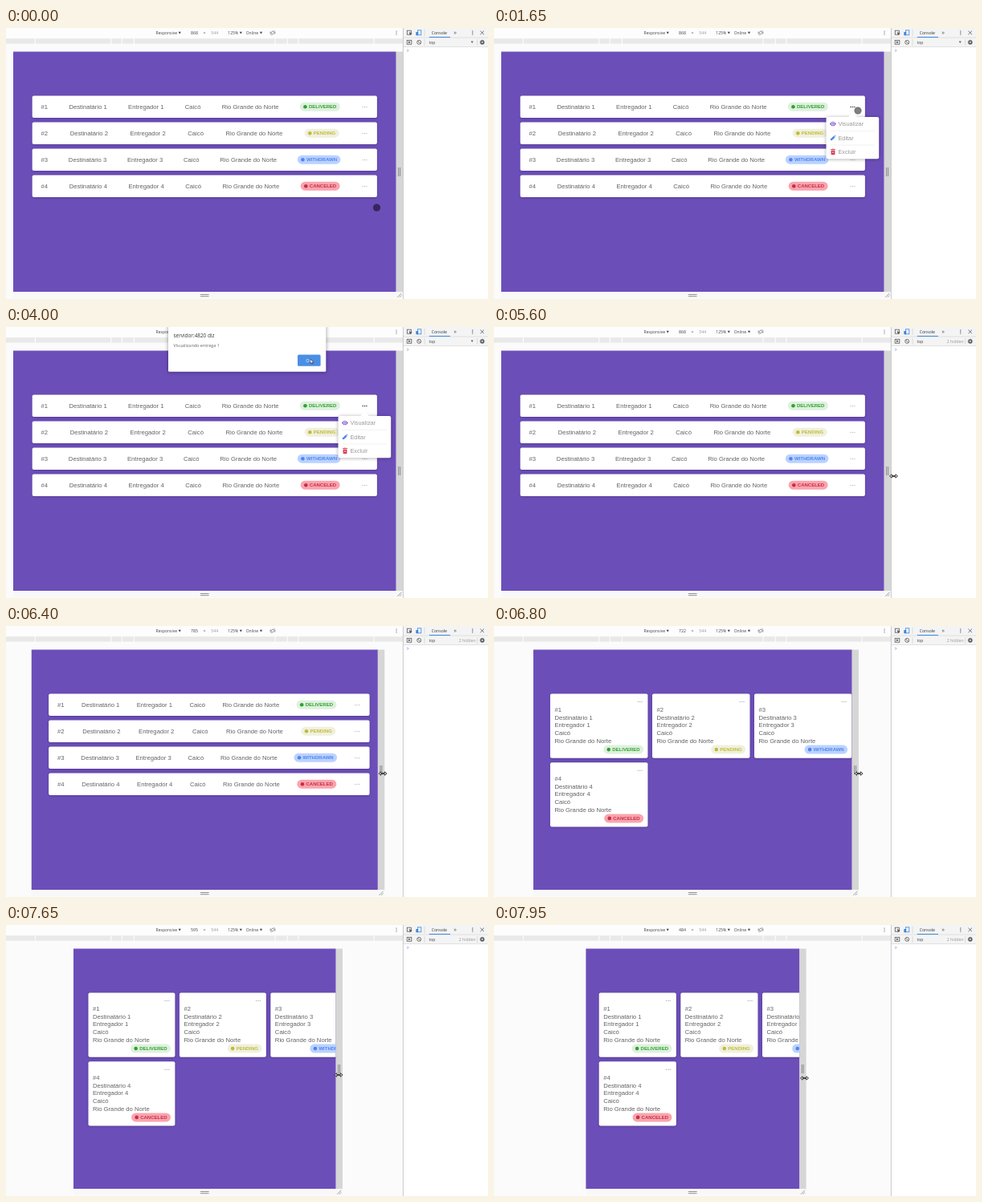
An HTML page with a canvas that plays this animation: 600 by 338 pixels, repeating every 8 s.

```html
<!DOCTYPE html>
<html lang="pt">
<head>
<meta charset="utf-8">
<title>Entregas</title>
<style>
  html, body { margin: 0; width: 100%; height: 100%; overflow: hidden; background: #fff; }
  canvas { display: block; width: 600px; height: 338px; }
</style>
</head>
<body>
<canvas id="stage"></canvas>
<script>
const W = 600, H = 338, LOOP = 8000, STEP = 50;
const SCALE = 0.549, MID = 247.25, TOP = 29.5, BOTTOM = 329;
const PAGE = '"Liberation Sans", Arial, sans-serif';
const CHROME = '"Open Sans", "Noto Sans", sans-serif';
const SIZE = 14 * SCALE, BADGE_SIZE = 11 * SCALE;

const MENU = [1500, 4800], DIALOG = [3100, 4200], HIDDEN_AT = 4250;

// [time, left edge of the viewport]
const EDGE = [[5900, 9], [6400, 31.75], [6800, 49], [7300, 65.3], [7650, 84], [7950, 114.4]];
// [time, x, y]
const POINTER = [
  [500, 461.5, 224], [1350, 447, 99], [1500, 447, 99], [1650, 453, 103], [2100, 453, 103],
  [2650, 440, 120], [3250, 440, 120], [3850, 379, 40], [4200, 379, 40],
  [4700, 447, 99], [4900, 447, 99], [5450, 497.5, 186], [5600, 497.5, 186],
  [5750, 490.5, 184], [5900, 491, 184], [6400, 469, 184], [6800, 454, 184],
  [7300, 440, 184], [7650, 414, 187], [7950, 386.5, 191]
];

const STATUS = [
  ['DELIVERED', '#dff0df', '#2ca42b'],
  ['PENDING', '#f0f0df', '#c1bc35'],
  ['WITHDRAWN', '#bad2ff', '#4d85ee'],
  ['CANCELED', '#faa4ae', '#c42f48']
];

const canvas = document.getElementById('stage');
const c = canvas.getContext('2d');
const dpr = window.devicePixelRatio || 1;
canvas.width = W * dpr;
canvas.height = H * dpr;

const within = (t, [a, b]) => t >= a && t < b;

function track(keys, t, i, ease = k => k) {
  if (t <= keys[0][0]) return keys[0][i];
  for (let n = 1; n < keys.length; n++) {
    const a = keys[n - 1], b = keys[n];
    if (t <= b[0]) return a[i] + (b[i] - a[i]) * ease((t - a[0]) / (b[0] - a[0]));
  }
  return keys[keys.length - 1][i];
}

function rect(x, y, w, h, fill) {
  c.fillStyle = fill;
  c.fillRect(x, y, w, h);
}

function box(x, y, w, h, r, fill, shadow = 0, alpha = 0.3) {
  c.save();
  if (shadow) {
    c.shadowColor = `rgba(0,0,0,${alpha})`;
    c.shadowBlur = shadow * dpr;
    c.shadowOffsetY = 0.5 * dpr;
  }
  c.fillStyle = fill;
  c.beginPath();
  c.roundRect(x, y, w, h, r);
  c.fill();
  c.restore();
}

function disc(x, y, r, fill) {
  c.fillStyle = fill;
  c.beginPath();
  c.arc(x, y, r, 0, Math.PI * 2);
  c.fill();
}

function ring(x, y, r, color, from = 0, to = Math.PI * 2) {
  c.strokeStyle = color;
  c.beginPath();
  c.arc(x, y, r, from, to);
  c.stroke();
}

function poly(points, fill, stroke) {
  c.beginPath();
  points.forEach(([x, y]) => c.lineTo(x, y));
  c.closePath();
  if (fill) { c.fillStyle = fill; c.fill(); }
  if (stroke) { c.strokeStyle = stroke; c.stroke(); }
}

function line(x1, y1, x2, y2, color, width = 0.6) {
  c.strokeStyle = color;
  c.lineWidth = width;
  c.beginPath();
  c.moveTo(x1, y1);
  c.lineTo(x2, y2);
  c.stroke();
}

// y is the vertical middle of the capitals
function text(str, x, y, size, color, family = CHROME, weight = 400) {
  c.font = `${weight} ${size}px ${family}`;
  c.fillStyle = color;
  c.fillText(str, x, y + size * 0.36);
}

function textWidth(str, size, weight = 400) {
  c.font = `${weight} ${size}px ${PAGE}`;
  return c.measureText(str).width;
}

const caret = (x, y) => poly([[x - 1.6, y - 1.3], [x + 1.6, y - 1.3], [x, y + 1.5]], '#444');

function dots(x, y, color, vertical = false, r = 0.75, gap = 2.4) {
  for (const k of [-1, 0, 1]) disc(x + (vertical ? 0 : k * gap), y + (vertical ? k * gap : 0), r, color);
}

function fields(n) {
  return ['#' + n, 'Destinatário ' + n, 'Entregador ' + n, 'Caicó', 'Rio Grande do Norte'];
}

const badgeWidth = n => textWidth(STATUS[n][0], BADGE_SIZE, 700) + 15.5;

function badge(n, x, y) {
  const [label, back, ink] = STATUS[n];
  box(x, y - 5.5, badgeWidth(n), 11, 5.5, back);
  disc(x + 6.6, y, 2.3, ink);
  text(label, x + 11.1, y, BADGE_SIZE, ink, PAGE, 700);
}

function drawRows(left, vw, menuOpen) {
  const x0 = left + vw * 0.05 - 0.2, w = Math.max(vw * 0.9 + 0.4, 399.5);
  const pad = 20 * SCALE, icon = 16 * SCALE;
  for (let n = 0; n < 4; n++) {
    const y = 84.5 + n * 33, mid = y + 13.9, items = fields(n + 1);
    box(x0, y, w, 27.5, 2, '#fff', 2.5);
    const widths = items.map(s => textWidth(s, SIZE));
    const used = widths.reduce((a, b) => a + b, badgeWidth(n) + icon);
    const gap = (w - 2 * pad - used) / 6;
    let x = x0 + pad;
    items.forEach((s, i) => {
      text(s, x, mid, SIZE, '#636363', PAGE);
      x += widths[i] + gap;
    });
    badge(n, x, mid - 0.2);
    dots(x0 + w - pad - icon / 2, mid, menuOpen && n === 0 ? '#333' : '#c4c4c4');
  }
}

function drawCards(left, vw) {
  const w = vw * 0.194 + 44.6, x0 = left + vw * 0.0357 + 6.8;
  for (let n = 0; n < 4; n++) {
    const x = x0 + (n % 3) * (w + 5.5), y = 84.5 + Math.floor(n / 3) * 85.8;
    box(x, y, w, 80.2, 2, '#fff', 2.5);
    dots(x + w - 9.9, y + 10, '#b8b8b8');
    fields(n + 1).forEach((s, i) => text(s, x + 5.5, y + 19.8 + i * 9.7, SIZE, '#636363', PAGE));
    badge(n, x + w - 5.4 - badgeWidth(n), y + 69.6);
  }
}

function drawMenu() {
  const x = 413.5, y = 111;
  box(x, y, 65.7, 52.3, 2, '#fff', 4, 0.35);
  poly([[441, 111.3], [446.5, 105.5], [452, 111.3]], '#fff');
  ['Visualizar', 'Editar', 'Excluir'].forEach((s, i) =>
    text(s, 428.4, 119.6 + i * 17.5, 7.35, '#999', PAGE));
  line(x + 5, 128.4, x + 60.5, 128.4, '#e8e8e8');
  line(x + 5, 146, x + 60.5, 146, '#e8e8e8');

  c.fillStyle = '#7a4fd0';
  c.beginPath();
  c.moveTo(418, 119.5);
  c.quadraticCurveTo(421.9, 113.8, 425.8, 119.5);
  c.quadraticCurveTo(421.9, 125.2, 418, 119.5);
  c.fill();
  disc(421.9, 119.5, 1.9, '#fff');
  disc(421.9, 119.5, 1.1, '#7a4fd0');

  poly([[418.8, 140.3], [419.2, 138.3], [423, 134.5], [424.7, 136.2], [420.9, 140]], '#4d85ee');
  poly([[423.5, 134], [424.2, 133.4], [425.7, 134.9], [425.1, 135.6]], '#4d85ee');

  box(419.6, 152.7, 4.8, 5.3, 0.7, '#d8324a');
  rect(419, 151.2, 6, 0.9, '#d8324a');
  rect(421, 150.7, 2, 0.8, '#d8324a');
  line(421, 154.1, 423, 156.3, '#fff');
  line(423, 154.1, 421, 156.3, '#fff');
}

function drawToolbar(vw) {
  rect(0, 0, 494, H, '#fbfbfb');
  rect(0, 0, 494, 12.5, '#fdfdfd');
  rect(0, 13.2, 494, 6.4, '#e9e9e9');
  for (const half of [160, 187.5, 212.5, 384])
    for (const side of [-1, 1]) rect(MID + side * half * SCALE - 0.6, 13, 1.2, 6.8, '#fbfbfb');

  const y = 6, ink = '#444';
  text('Responsive', 186.6, y, 5, ink);
  caret(216.2, y);
  text(String(Math.round(vw / SCALE)), 230, y, 5.2, ink);
  text('×', 245.3, y, 6, '#777');
  text('544', 255.3, y, 5.2, '#999');
  text('125%', 276.3, y, 5, ink);
  caret(292.3, y);
  text('Online', 298.7, y, 5, ink);
  caret(317.5, y);
  c.lineWidth = 0.7;
  poly([[332, 3.8], [334.2, 6], [332, 8.2], [329.8, 6]], null, '#666');
  ring(332, 6, 3.1, '#777', -1.2, 0.6);
  ring(332, 6, 3.1, '#777', 1.95, 3.75);
  dots(486, y, '#555', true, 0.6, 2);
}

function drawFrame(left, vw) {
  const right = left + vw;
  rect(left, BOTTOM, vw + 8.5, 8, '#f8f8f8');
  rect(right, TOP, 8.5, BOTTOM - TOP, '#d6d6d6');
  rect(left, TOP, vw, BOTTOM - TOP, '#6c4eb9');
  for (const dx of [3.1, 5.1]) line(right + dx, 174, right + dx, 185, '#777', 0.8);
  for (const y of [332.5, 334.7]) line(242, y, 252.6, y, '#777', 0.8);
  line(right + 1.8, 335.8, right + 6.8, 330.8, '#777', 0.7);
  line(right + 4.4, 335.8, right + 6.8, 333.4, '#777', 0.7);
}

function drawDevtools(t) {
  const hidden = t >= HIDDEN_AT, ink = '#555', blue = '#3b86e0';
  rect(494, 0, 106, H, '#fff');
  rect(494, 0, 106, 23.4, '#f4f4f4');
  line(494, 12, W, 12, '#d2d2d2');
  line(494, 23.5, W, 23.5, '#d2d2d2');
  line(494.4, 0, 494.4, H, '#c4c4c4', 0.9);
  for (const y of [2, 14]) line(521, y, 521, y + 8, '#ccc');

  c.lineWidth = 0.8;
  c.strokeStyle = ink;
  c.strokeRect(499.3, 3.2, 5, 5);
  poly([[501.6, 5], [505.8, 6.8], [503.9, 7.4], [503.2, 9.3]], ink);
  c.strokeStyle = blue;
  c.strokeRect(512.4, 2.8, 4.4, 6);
  box(510.3, 5, 2.9, 4.2, 0.4, blue);

  text('Console', 529.8, 6, 5.1, '#333');
  rect(526.8, 10.9, 26.2, 1, blue);
  text('»', 557.2, 5.4, 7.5, ink);
  dots(580.8, 6, ink, true, 0.65, 2.1);
  line(590.4, 3.6, 595, 8.2, ink, 0.8);
  line(595, 3.6, 590.4, 8.2, ink, 0.8);

  c.lineWidth = 0.8;
  c.strokeStyle = ink;
  c.strokeRect(499.2, 15.3, 5.6, 4.9);
  poly([[501, 16.3], [503.6, 17.8], [501, 19.3]], ink);
  ring(514.2, 17.8, 2.5, ink);
  line(512.5, 16, 515.9, 19.6, ink, 0.8);
  text('top', 526.4, 17.9, 5.1, '#444');
  if (hidden) text('2 hidden', 563.8, 17.8, 5.1, '#999');
  else {
    poly([[578.8, 16.6], [581.6, 16.6], [580.2, 19]], '#555');
  }
  line(586.6, 14, 586.6, 22, '#ccc');
  for (let k = 0; k < 4; k++) {
    const a = k * Math.PI / 4, dx = Math.cos(a) * 3.1, dy = Math.sin(a) * 3.1;
    line(592.8 - dx, 17.8 - dy, 592.8 + dx, 17.8 + dy, ink, 1.1);
  }
  disc(592.8, 17.8, 2.2, ink);
  disc(592.8, 17.8, 1, '#f4f4f4');

  const tint = hidden ? '#4a90e0' : '#6b86b8';
  line(499.3, 26.6, 500.8, 28.1, tint, 0.8);
  line(500.8, 28.1, 499.3, 29.6, tint, 0.8);
}

function drawDialog() {
  box(202, -4, 196.3, 59.7, 1.5, '#fff', 5, 0.4);
  text('servidor:4820 diz', 208.5, 10.8, 6.4, '#333');
  text('Visualizando entrega 1', 208.5, 23.4, 5.45, '#666');
  box(363, 34.6, 28.6, 14.2, 1.5, '#4a8fe4');
  text('Ok', 373.3, 41.8, 5.4, '#fff');
}

function drawPointer(t, right) {
  const ease = t < 5700 ? k => k * k * (3 - 2 * k) : undefined;
  const x = track(POINTER, t, 1, ease), y = track(POINTER, t, 2, ease);
  c.lineWidth = 0.6;
  if (within(t, DIALOG) || y < TOP) {
    const shape = [[0, 0], [0, 5.6], [1.3, 4.4], [2.2, 6.3], [3, 5.9], [2.2, 4], [3.9, 4]];
    poly(shape.map(([dx, dy]) => [x + dx, y + dy]), '#fff', '#222');
  } else if (x < right) {
    disc(x, y, 4.5, 'rgba(0,0,0,0.5)');
    ring(x, y, 4.2, 'rgba(0,0,0,0.18)');
  } else {
    c.lineWidth = 1;
    const arrow = [
      [-5, 0], [-2.4, -2.2], [-2.4, -0.6], [2.4, -0.6], [2.4, -2.2],
      [5, 0], [2.4, 2.2], [2.4, 0.6], [-2.4, 0.6], [-2.4, 2.2]
    ];
    poly(arrow.map(([dx, dy]) => [x + dx, y + dy]), '#fff', '#333');
  }
}

function draw(t) {
  const left = track(EDGE, t, 1), vw = 2 * (MID - left);
  const menuOpen = within(t, MENU);
  c.setTransform(dpr, 0, 0, dpr, 0, 0);
  drawToolbar(vw);
  drawFrame(left, vw);

  c.save();
  c.beginPath();
  c.rect(left, TOP, vw, BOTTOM - TOP);
  c.clip();
  if (vw / SCALE > 768) drawRows(left, vw, menuOpen);
  else drawCards(left, vw);
  if (menuOpen) drawMenu();
  c.restore();

  drawDevtools(t);
  if (within(t, DIALOG)) drawDialog();
  drawPointer(t, left + vw);
}

function tick() {
  const t = performance.now() % LOOP;
  draw(Math.floor(t / STEP) * STEP);
  requestAnimationFrame(tick);
}
tick();
</script>
</body>
</html>
```
